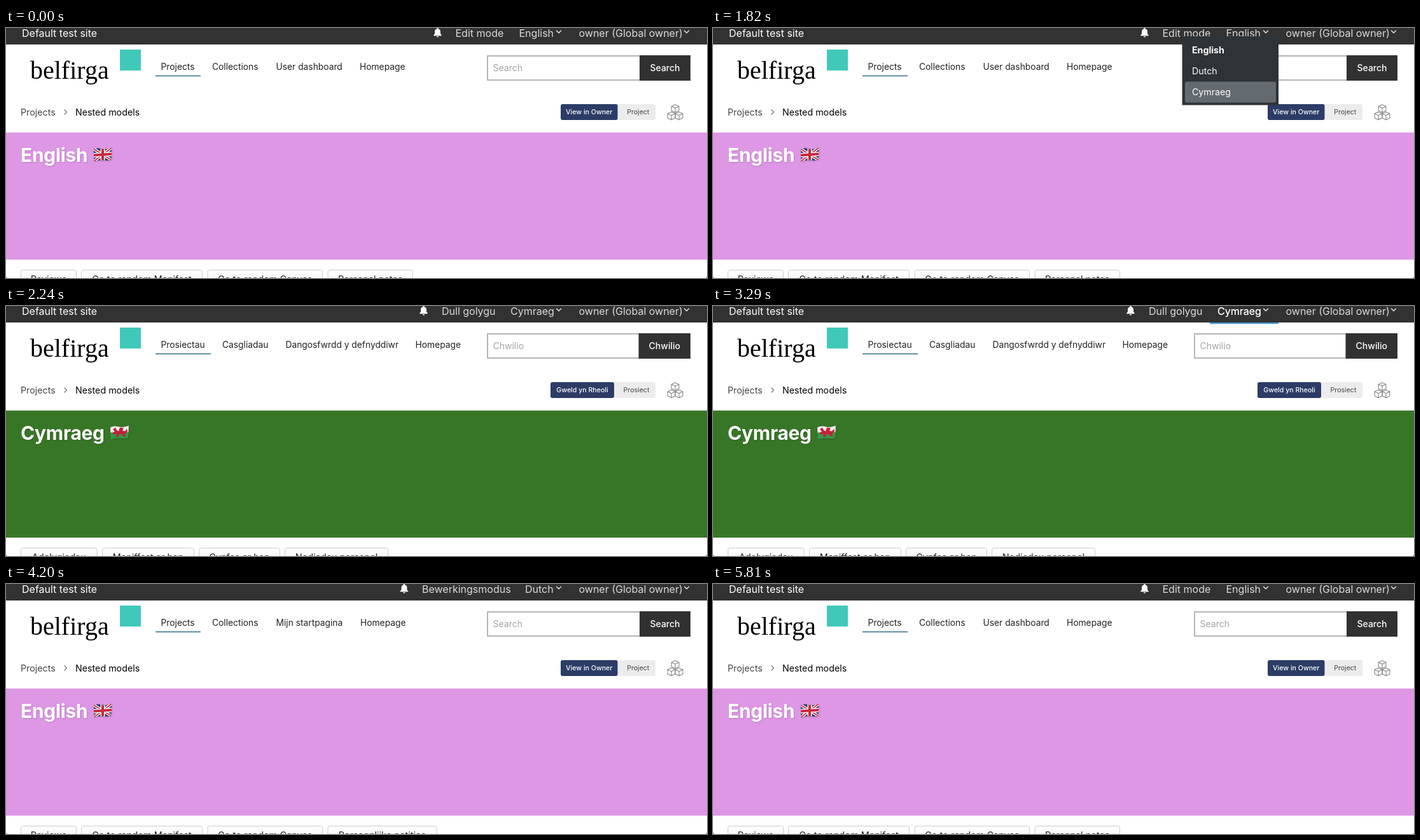
An HTML page that plays this animation: 1102 by 394 pixels, repeating every 6.51 s.

```html
<!DOCTYPE html>
<html lang="en">
<head>
<meta charset="utf-8">
<title>Language switcher</title>
<style>
html, body { margin: 0; width: 100%; height: 100%; overflow: hidden; background: #fff; }
svg { display: block; }
text { font: 13.8px Inter, "Open Sans", sans-serif; fill: #222; }
.bar { font-size: 16px; fill: #dadada; }
.white { fill: #fff; }
.crumb { font-size: 14.25px; fill: #444; }
.here { font-size: 14.25px; fill: #000; }
.hint { font-size: 14px; fill: #a3a3a8; }
.go { font-size: 14px; font-weight: 500; fill: #fff; text-anchor: middle; }
.tag { font-size: 10.6px; fill: #444; text-anchor: middle; }
.tag.white { font-weight: 500; fill: #fff; }
.title { font-size: 30px; font-weight: 700; letter-spacing: -.3px; fill: #fff; }
.banner { filter: drop-shadow(1px 1px 1px rgba(0, 0, 0, .16)); }
.button { font-size: 14.5px; text-anchor: middle; }
.item { font-size: 14.2px; fill: #fff; }
.current { font-weight: 700; }
.brand { font: 40px "Liberation Serif", serif; fill: #000; }
.line { fill: none; stroke-linecap: round; stroke-linejoin: round; }
.timed { opacity: 0; animation: 6510ms step-end infinite; }

@keyframes page-en { 0%, 89.247%, 100% { opacity: 1 } 34.408% { opacity: 0 } }
@keyframes page-cy { 0%, 64.516%, 100% { opacity: 0 } 34.408% { opacity: 1 } }
@keyframes page-nl { 0%, 89.247%, 100% { opacity: 0 } 64.516% { opacity: 1 } }

@keyframes hover-en { 0%, 23.655%, 100% { opacity: 0 } 21.505% { opacity: 1 } }
@keyframes hover-cy { 0%, 52.688%, 100% { opacity: 0 } 50.537% { opacity: 1 } }
@keyframes hover-nl { 0%, 79.569%, 100% { opacity: 0 } 77.419% { opacity: 1 } }

@keyframes menu-en { 0%, 34.408%, 100% { opacity: 0 } 22.58% { opacity: 1 } }
@keyframes menu-cy { 0%, 64.516%, 100% { opacity: 0 } 51.612% { opacity: 1 } }
@keyframes menu-nl { 0%, 89.247%, 100% { opacity: 0 } 78.494% { opacity: 1 } }

@keyframes pick-en { 0%, 34.408%, 100% { opacity: 0 } 27.956% { opacity: 1 } }
@keyframes pick-cy { 0%, 64.516%, 100% { opacity: 0 } 55.913% { opacity: 1 } }
@keyframes pick-nl { 0%, 89.247%, 100% { opacity: 0 } 80.645% { opacity: 1 } }
@keyframes passed-cy { 0%, 62.365%, 100% { opacity: 0 } 51.612% { opacity: .12 } }
</style>
</head>
<body>
<svg id="stage" width="1102" height="394" viewBox="0 0 1102 394">
  <defs>
    <linearGradient id="sheen" x2="0" y2="1">
      <stop offset="0" stop-color="#fff"/><stop offset="1" stop-color="#eee"/>
    </linearGradient>
    <clipPath id="wave">
      <path d="M0 3C5 0 9 1 14 2S24 2 29 0L28 19C24 21 19 20 14 20S5 20 1 22Z"/>
    </clipPath>
    <g id="uk" clip-path="url(#wave)">
      <path fill="#273a75" d="M0-1H29V23H0Z"/>
      <path stroke="#f4f4f4" stroke-width="4.5" d="M0 2 29 20M0 22 29 0"/>
      <path stroke="#c9283e" stroke-width="1.6" d="M0 2 29 20M0 22 29 0"/>
      <path stroke="#f4f4f4" stroke-width="7" d="M14.5-1V23M0 12 29 10"/>
      <path stroke="#c9283e" stroke-width="4" d="M14.5-1V23M0 12 29 10"/>
    </g>
    <g id="wales" clip-path="url(#wave)">
      <path fill="#f1f1f1" d="M0-1H29V11H0Z"/>
      <path fill="#2f9a4a" d="M0 12 29 10V23H0Z"/>
      <path fill="#c5203a" d="M4 6 8 3 10 7 13 9 15 3 21 4 19 8 23 9 26 5 27 9 24 13 22 12 25 17 20 17 18 13 14 14 13 18 9 18 10 13 6 14 3 12 7 9Z"/>
    </g>
    <path id="bell" fill="#fff" d="M0-7C.9-7 1.2-6.4 1.2-5.7 3.5-5 4.5-3.3 4.5-1V2L6.3 4.4V5.2H-6.3V4.4L-4.5 2V-1C-4.5-3.3-3.5-5-1.2-5.7-1.2-6.4-.9-7 0-7ZM-1.7 6H1.7C1.5 8-1.5 8-1.7 6Z"/>
    <path id="arrow" class="line" stroke="#e4e4e4" stroke-width="1.5" d="M-3.5-1.8 0 1.7 3.5-1.8"/>
    <path id="cube" class="line" stroke="#858585" stroke-width="1.1" d="M0-6.2 5.9-3.6V3.2L0 6.2-5.9 3.2V-3.6ZM-5.9-3.6 0-.8 5.9-3.6M0-.8V6.2"/>
  </defs>
</svg>
<script>
const english = {
  nav: [['Projects', 243.5], ['Collections', 324], ['User dashboard', 424.5], ['Homepage', 556]],
  navEnd: 306, search: 'Search', searchX: 996,
  view: 'View in Owner', viewX: 872, viewEnd: 961.5, kind: 'Project',
  title: 'English', flag: 'uk', flagX: 137.5, colour: '#dd97e4',
  buttons: [['Reviews', 23, 111], ['Go to random Manifest', 118, 309],
            ['Go to random Canvas', 316.5, 498], ['Personal notes', 505.5, 640]]
};

// In menu order; pick and passed are menu positions.
const pages = [
  { ...english, id: 'en', label: 'English', labelX: 806.5, edit: 'Edit mode', editX: 706.5,
    bell: 678.5, pick: 2 },
  { ...english, id: 'nl', label: 'Dutch', labelX: 816, edit: 'Bewerkingsmodus', editX: 654,
    bell: 626, pick: 0,
    nav: [...english.nav.slice(0, 2), ['Mijn startpagina', 424.5], ['Homepage', 557]],
    buttons: [...english.buttons.slice(0, 3), ['Persoonlijke notities', 505.5, 677.5]] },
  { id: 'cy', label: 'Cymraeg', labelX: 793, edit: 'Dull golygu', editX: 685,
    bell: 656.5, pick: 1, passed: 0,
    nav: [['Prosiectau', 243.5], ['Casgliadau', 340], ['Dangosfwrdd y defnyddiwr', 439.5], ['Homepage', 643.5]],
    navEnd: 322, search: 'Chwilio', searchX: 994.5,
    view: 'Gweld yn Rheoli', viewX: 856, viewEnd: 956, kind: 'Prosiect',
    title: 'Cymraeg', flag: 'wales', flagX: 164, colour: '#387627',
    buttons: [['Adolygiadau', 23, 143.5], ['Maniffest ar hap', 151, 296],
              ['Cynfas ar hap', 303, 431], ['Nodiadau personol', 438, 601]] }
];

const text = (x, y, words, kind = '') => `<text x="${x}" y="${y}" class="${kind}">${words}</text>`;
const rect = (x, y, x2, y2, fill, more = '') =>
  `<rect x="${x}" y="${y}" width="${x2 - x}" height="${y2 - y}" fill="${fill}" ${more}/>`;
const use = (id, x, y) => `<use href="#${id}" x="${x}" y="${y}"/>`;
const timed = (name, body) => `<g class="timed" style="animation-name:${name}">${body}</g>`;
const itemTop = i => 18 + i * 33.2;
const mark = i => rect(742, itemTop(i), 885, itemTop(i) + 33, '#636a70', 'rx="3"');

const button = ([words, x, x2]) =>
  rect(x + .5, 381.5, x2 - .5, 412, 'url(#sheen)', 'rx="3" stroke="#ccc"') +
  text((x + x2) / 2, 400.5, words, 'button');

const menu = p => timed('menu-' + p.id,
  rect(737.5, 13, 889, 121.5, '#2e3337') +
  (p.passed === undefined ? '' : timed('passed-' + p.id, mark(p.passed))) +
  timed('pick-' + p.id, mark(p.pick)) +
  pages.map((q, i) =>
    text(753, itemTop(i) + 21.6, q.label, q === p ? 'item current' : 'item')).join(''));

const page = p => timed('page-' + p.id,
  rect(0, 0, 1102, 394, '#fff') +
  rect(0, 0, 1102, 26, '#323232') +
  text(25, 14, 'Default test site', 'bar white') +
  use('bell', p.bell, 7) +
  text(p.editX, 14, p.edit, 'bar') +
  text(p.labelX, 14, p.label, 'bar') +
  text(900.5, 14, 'owner (Global owner)', 'bar') +
  use('arrow', 869, 6) + use('arrow', 1070, 6) +

  text(38, 80, 'belfirga', 'brand') +
  rect(179, 34, 212, 67, '#40c9b9') +
  p.nav.map(([words, x]) => text(x, 65.5, words)).join('') +
  rect(235, 74.5, p.navEnd, 76.3, '#4d7f9a') +
  rect(757, 44, p.searchX + 4, 82, '#fff', 'stroke="#b5b5b9" stroke-width="2"') +
  text(765.5, 68, p.search, 'hint') +
  rect(p.searchX, 43, 1076, 83, '#313131') +
  text((p.searchX + 1076) / 2, 68, p.search, 'go') +

  text(23, 137.5, 'Projects', 'crumb') +
  '<path class="line" stroke="#777" stroke-width="1.3" d="M92 129 95.5 132.5 92 136"/>' +
  text(109, 137.5, 'Nested models', 'here') +
  rect(p.viewEnd - 4, 120, 1021, 145, '#ececec', 'rx="3"') +
  rect(p.viewX, 120, p.viewEnd, 145, '#2c3c66', 'rx="3"') +
  text((p.viewX + p.viewEnd) / 2, 136.4, p.view, 'tag white') +
  text((p.viewEnd + 1026) / 2, 136.4, p.kind, 'tag') +
  use('cube', 1052, 127) + use('cube', 1046, 138.5) + use('cube', 1058, 138.5) +

  rect(0, 164.7, 1102, 365, p.colour) +
  `<g class="banner">${text(23, 211.3, p.title, 'title')}${use(p.flag, p.flagX, 188.5)}</g>` +
  p.buttons.map(button).join('') +

  timed('hover-' + p.id,
    text(p.labelX, 14, p.label, 'bar white') +
    rect(p.labelX - 12, 26, 889, 28.3, '#459bd3')) +
  menu(p));

document.getElementById('stage').insertAdjacentHTML('beforeend',
  pages.map(page).join('') +
  '<path fill="#666" d="M0 391Q0 394 3 394H0ZM1102 391Q1102 394 1099 394H1102Z"/>');
</script>
</body>
</html>
```
